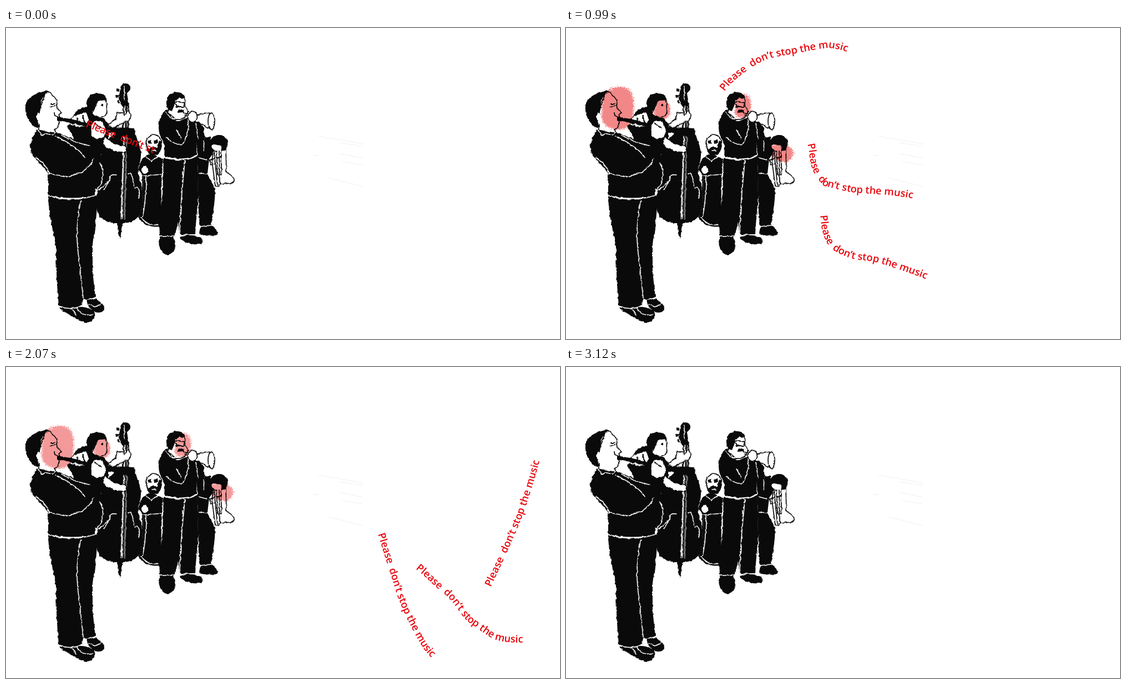
These frames come from a looping animation (998x561 px, 3.15 s). An HTML page:

```html
<!DOCTYPE html>
<html lang="en">
<head>
<meta charset="utf-8">
<title>Jazz band</title>
<style>
html, body { margin: 0; width: 100%; height: 100%; overflow: hidden; background: #fff; }
svg { display: block; width: 998px; height: 561px; }
.b { fill: #0a0a0a; }
.w { fill: #fff; stroke: #0a0a0a; stroke-width: 1.7; }
.l { fill: none; stroke: #fff; stroke-width: 1.6; }
.k { fill: none; stroke: #0a0a0a; stroke-width: 1.8; }
.b, .w, .l, .k { stroke-linejoin: round; stroke-linecap: round; }
#tint { fill: #e61414; mix-blend-mode: multiply; }
text { font: 600 18.2px "Open Sans", "Noto Sans", sans-serif; fill: #e8060c; white-space: pre; }
</style>
</head>
<body>
<svg viewBox="0 0 998 561">
<defs>
  <filter id="ink" x="0" y="0" width="998" height="561" filterUnits="userSpaceOnUse" color-interpolation-filters="sRGB">
    <feTurbulence type="fractalNoise" baseFrequency=".14" numOctaves="2" seed="4"/>
    <feDisplacementMap in="SourceGraphic" scale="4" xChannelSelector="R" yChannelSelector="G"/>
  </filter>
  <filter id="spray" x="40" y="80" width="400" height="200" filterUnits="userSpaceOnUse" color-interpolation-filters="sRGB">
    <feTurbulence type="fractalNoise" baseFrequency=".8" numOctaves="2" seed="7"/>
    <feDisplacementMap in="SourceGraphic" scale="13" xChannelSelector="R" yChannelSelector="G"/>
  </filter>
</defs>

<path d="M562 195L643 209M600 207L643 213M553 230H563M600 226L643 235M606 241L643 247M581 270L643 286" fill="none" stroke="#f5f5f5" stroke-width="1.5"/>

<g filter="url(#ink)">
  <!-- trombonist -->
  <path class="b" d="M346 264L362 262 377 290C376 320 372 335 370 356L350 358 347 340Z"/>
  <path class="b" d="M350 359C358 355 365 355 372 358 380 364 383 368 380 374 370 378 360 374 348 371Z"/>
  <path class="w" d="M370 207C368 220 372 232 384 234 392 232 396 222 397 212Z"/>
  <path class="b" d="M343 172C352 178 358 190 358 196L369 197 370 215 376 222 366 236 363 262 346 264 344 210Z"/>
  <path class="b" d="M369 212C366 199 374 193 384 193 395 193 401 201 399 212 398 219 394 223 389 222L387 211C381 213 375 207 369 212Z"/>
  <path class="w" d="M388 221L396 220 397 258C400 265 412 266 411 276 408 282 395 280 386 281L383 286 377 285 371 240 373 223 379 222 381 264 388 265Z"/>
  <path class="k" d="M375 225L381 284M384 222L385 282M366 238L376 235 377 245 369 247Z"/>
  <path class="l" d="M347 234L362 238M348 262L362 263M350 358L370 356M357 198L356 222"/>

  <!-- drummer -->
  <path class="b" d="M247 266L281 262 278 358C262 361 242 352 239 342 246 330 248 300 247 266Z"/>
  <path class="k" d="M246 268C247 300 246 325 239 342"/>
  <path class="l" d="M243 341C250 352 264 357 275 355M252 268C252 300 250 325 246 340M247 267L280 264"/>
  <path class="b" d="M243 240C250 228 258 225 268 230L283 236 281 263 246 266 238 255Z"/>
  <ellipse class="w" cx="266" cy="210" rx="14" ry="18"/>
  <path class="b" d="M252 212C253 224 259 230 267 230 277 229 282 218 280 205L275 203 273 216 264 214 256 219ZM255 204l6-2 2 5-6 2ZM266 203l6-1 1 6-6 1Z"/>
  <path class="l" d="M263 221L270 221M252 232L262 240 274 232"/>
  <ellipse class="w" cx="250" cy="256" rx="7" ry="8"/>

  <!-- bassist -->
  <path class="b" d="M123 156C130 143 145 139 153 145 158 158 166 162 176 162L184 174 184 206 180 290 160 290 120 195 111 178Z"/>
  <path class="w" d="M166 126L178 126C182 137 182 142 181 146L182 152C180 158 178 160 170 161 165 162 158 160 156 154Z"/>
  <path class="b" d="M145 140C144 125 153 118 165 118 175 118 182 122 180 130L172 131C166 130 164 135 163 140L158 149C150 152 146 150 145 140ZM171 137h4v4h-4Z"/>

  <!-- double bass -->
  <path class="b" d="M180 205L200 186 231 182C232 195 241 205 243 225 244 242 236 250 238 265 247 285 249 310 243 330 238 348 222 353 205 352 183 353 168 345 164 330 160 310 164 290 172 278 168 260 174 230 180 205Z"/>
  <path class="b" d="M201 350H210L206 380 202 372ZM203 130L206 108C208 98 223 97 224 108 224 115 219 114 218 118L222 142 211 144ZM204 110l-5-1v5l5 1ZM204 120l-6 1 1 5 6-1ZM205 129l-5 2 2 5 5-1Z"/>
  <path d="M212 140H221L216 345H205Z" fill="#777"/>
  <path class="k" d="M212 140L205 345M221 140L216 345M217 140L211 345"/>
  <path class="l" d="M214 144L208 340M213 106L213 130M164 292C172 293 176 282 186 276 186 264 192 264 199 265M220 263C231 261 227 278 232 288 240 286 242 297 239 308M176 292C182 284 184 278 188 270M160 236C176 244 180 272 165 290M171 228C164 234 161 238 161 242"/>
  <path class="w" d="M178 194C188 206 202 214 214 212 220 216 218 224 212 224 198 224 182 220 174 210Z"/>
  <path class="w" d="M183 176L198 164 200 153C207 154 210 150 213 157L221 149C227 154 226 163 220 167L209 172 194 181Z"/>

  <!-- trumpeter -->
  <path class="b" d="M277 376H301C303 385 308 393 302 402 296 411 285 411 280 402 274 394 275 385 277 376ZM313 376C325 373 338 373 345 376 355 378 357 385 352 389 342 392 328 390 314 381Z"/>
  <path class="b" d="M284 234C305 241 330 240 345 231L347 300C345 320 342 350 341 372L318 374 312 370 311 350C308 360 305 372 301 377L277 375C275 350 279 320 282 300Z"/>
  <path class="b" d="M290 147C280 152 275 165 275 180 276 195 282 205 286 212L285 233C305 238 330 238 343 230L344 205 358 203 356 180 346 167 330 160 312 168 300 164Z"/>
  <path class="w" d="M300 124L320 121C324 132 323 140 324 143L328 150 325 155C324 162 318 166 306 165L292 152Z"/>
  <path class="b" d="M289 137C288 120 300 114 310 116 319 117 322 121 322 127L312 126C306 128 304 134 303 140L299 150 291 148ZM310 147L320 148 322 154 318 152 310 153Z"/>
  <path class="k" d="M303 134L310 133 322 135 321 142 307 142Z"/>
  <path class="w" d="M340 157L356 155 372 152 371 184C362 180 350 169 338 169Z"/>
  <ellipse class="w" cx="370" cy="168" rx="6" ry="15.5"/>
  <path class="k" d="M320 153L337 158M322 157L334 162" stroke-width="3"/>
  <ellipse class="w" cx="336" cy="160" rx="8.5" ry="10"/>
  <path class="l" d="M288 152L298 164 307 163M289 197C300 208 312 212 318 210 325 200 326 185 330 178M307 184L316 199M327 165L330 184M342 172L346 200M285 232C305 238 330 238 343 230M322 240C320 270 314 310 313 370M318 258L318 270M278 375H300M315 373H341"/>

  <!-- clarinettist -->
  <path class="b" d="M97 505C100 500 120 503 130 503 142 503 157 505 160 515 162 523 155 531 145 531 130 530 122 520 103 511ZM145 490C150 486 158 486 164 487 168 495 178 500 177 508 172 516 160 514 155 509L147 499Z"/>
  <path class="b" d="M76 303C100 312 140 312 163 301 165 325 163 345 156 390V440L161 485 146 491 140 487 136 500C125 508 105 505 95 500 92 470 90 430 90 395 84 360 77 340 76 303Z"/>
  <path class="w" d="M60 150L72 113C80 114 84 124 90 128 93 134 91 140 92 145L100 153 95 156 97 161 94 164 95 170C96 177 92 182 87 183L93 192 60 187Z"/>
  <path class="b" d="M57 183C50 192 44 205 43 214 44 224 50 232 56 238L76 262V302C100 309 140 309 160 302L161 262C168 250 170 238 171 228L174 200 158 190 150 206 128 203 97 190 78 187Z"/>
  <path class="b" d="M35 148C34 132 44 122 57 118L72 113 77 116C70 118 64 126 63 137L61 152C57 152 54 158 56 165L60 178C58 181 55 180 52 179 44 172 36 162 35 148Z"/>
  <path class="w" d="M70 155C62 149 55 156 57 165 59 174 64 178 70 177" style="stroke:none"/>
  <path class="k" d="M80 137L88 137M79 143L88 140M87 153L88 158 95 161"/>
  <path class="w" d="M116 165C120 155 133 157 145 151L150 166 142 178 126 179Z" style="stroke-width:1.3"/>
  <path class="b" d="M92 160L116 164 180 178 231 181V199L178 187 116 171 92 166Z"/>
  <path class="w" d="M153 176C157 166 166 164 174 168L181 184C181 194 173 200 164 202L153 195Z"/>
  <path class="k" d="M160 172L172 180M128 162L130 178M138 158L142 172"/>
  <path class="l" d="M58 184L64 194 70 190 84 193 90 187M90 195C110 205 134 220 142 234M100 193L126 206 150 212M77 263L110 268C130 264 148 258 158 236M78 262C72 248 64 240 55 234M76 302C100 309 140 309 161 302M135 311C126 350 127 390 132 420L139 487M97 503C110 507 128 507 137 500M144 491L161 487M128 506C134 516 142 520 157 516M120 508L126 518M148 498L160 503 170 499M104 171L132 176"/>
</g>

<g id="tint" filter="url(#spray)">
  <path d="M66 125C70 112 86 105 100 106 116 107 123 120 122 140 122 158 117 182 100 183 80 184 63 176 64 155Z"/>
  <path d="M162 130L178 127C186 136 190 146 187 156 183 166 168 166 158 158Z"/>
  <path d="M305 126C312 118 324 117 330 125 336 136 334 150 326 158 318 165 308 161 304 154Z"/>
  <path d="M369 213C380 206 398 208 409 220 412 232 404 242 393 242 380 240 368 235 369 225Z"/>
</g>

<g id="lines"></g>
<text id="intro" transform="translate(143 178) rotate(21.5)">Please&#160; don’t st</text>
</svg>

<script>
const LOOP = 3150, STEP = 30;
const $ = id => document.getElementById(id);
const phrase = "Please\u00a0 don’t stop the music";

// Each route: points of the baseline, offset at 1290 ms, speed in px/ms.
const routes = [
  ["214,209 241,199 251,180 266,146 284,116 310,89 358,58 418,45 462,37 483,37 517,47 554,66 581,85 590,97 611,137 624,164 647,230 698,390 708,420 726,461 754,510 782,537 797,539 838,534 875,526 926,509 970,497 1010,480 1300,420", 282, .524],
  ["366,163 376,165 396,170 415,180 434,206 443,252 461,281 475,287 514,296 550,299 588,302 627,308 661,318 700,336 744,369 774,396 801,420 827,454 845,468 872,487 895,495 928,497 965,495 1010,488 1300,470", 192, .345],
  ["386,272 404,280 424,290 450,314 457,332 461,362 470,387 484,402 516,416 556,422 599,435 651,454 690,472 726,481 782,486 800,484 829,470 846,453 863,419 917,301 943,231 964,155 963,117 952,66 945,30 938,-10 900,-300", 248, .482]
];

// Smooth curve through all points (Catmull-Rom).
function curve(points) {
  const p = points.split(" ").map(s => s.split(",").map(Number));
  const at = i => p[Math.max(0, Math.min(p.length - 1, i))];
  const handle = (a, from, to, sign) => a.map((v, k) => v + sign * (to[k] - from[k]) / 6);
  return "M" + p[0] + p.slice(1).map((q, i) =>
    "C" + [handle(p[i], at(i - 1), q, 1), handle(q, p[i], at(i + 2), -1), q].join(" ")).join("");
}

$("lines").innerHTML = routes.map(([points], i) =>
  `<path id="r${i}" d="${curve(points)}" fill="none"/>
   <text><textPath href="#r${i}">${phrase}</textPath></text>`).join("");
const texts = document.querySelectorAll("textPath");

const glow = [[0, 0], [690, .32], [1290, .71], [1800, .15], [2310, .69], [2670, .38], [3120, 0], [LOOP, 0]];
function glowAt(t) {
  const i = glow.findIndex(([time]) => time > t);
  const [t0, a] = glow[i - 1], [t1, b] = glow[i];
  return a + (b - a) * (t - t0) / (t1 - t0);
}

function draw(now) {
  const t = Math.floor(now % LOOP / STEP) * STEP;
  routes.forEach(([, base, speed], i) =>
    texts[i].setAttribute("startOffset", base + speed * (t - 1290)));
  $("tint").style.opacity = glowAt(t);
  $("intro").style.display = t < STEP ? "" : "none";
}

const begin = performance.now();
function tick() {
  draw(performance.now() - begin);
  requestAnimationFrame(tick);
}
tick();
</script>
</body>
</html>
```
